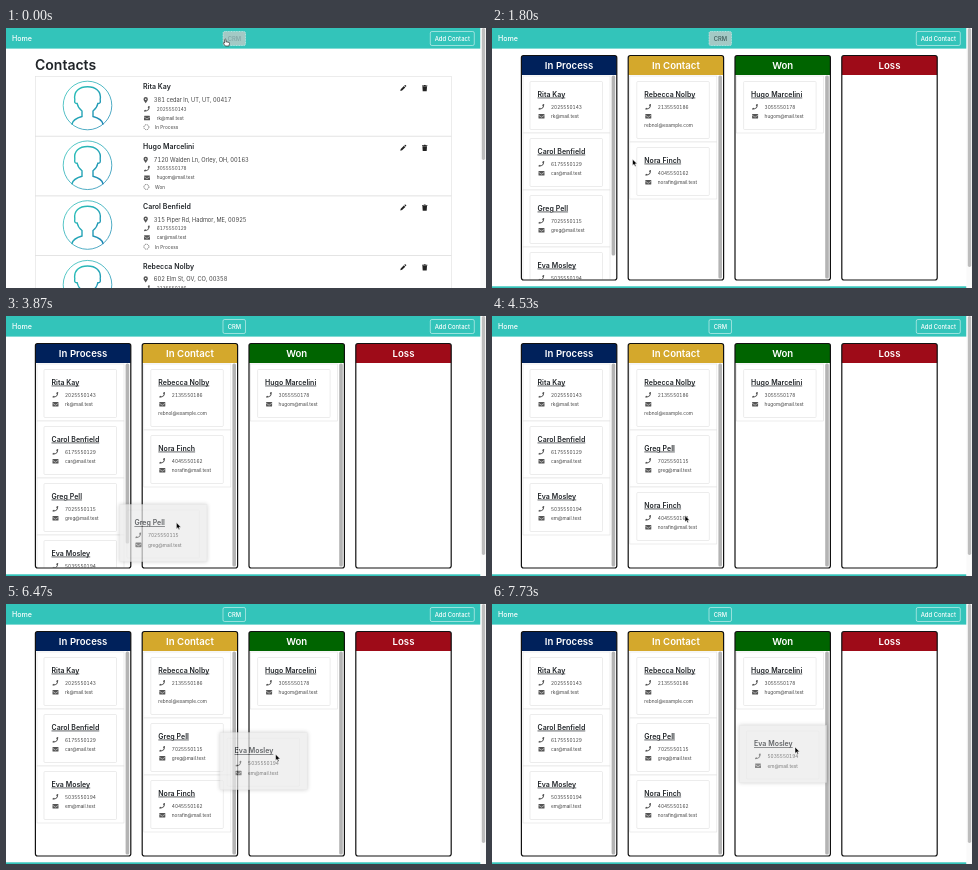
Write an HTML page that moves like this. It is 480 px wide and 260 px high and loops after 8 s.

```html
<!DOCTYPE html>
<html lang="en">
<head>
<meta charset="utf-8">
<title>Contact board</title>
<style>
html, body { margin: 0; width: 480px; height: 260px; overflow: hidden; background: #fff; }
svg { display: block; }
text { font-family: Inter, Roboto, sans-serif; font-variant-numeric: tabular-nums; fill: #444; }
.name { font-weight: 600; fill: #212529; }
.link { text-decoration: underline; }
.line { fill: none; stroke: #e0e0e0; stroke-width: .6; }
.nav { fill: #fff; font-weight: 500; }
.title { fill: #fff; font-weight: 600; }
.btn { fill: none; stroke: #fff; stroke-width: .5; }
#ghost { opacity: .7; filter: drop-shadow(0 .5px 2px #0004); }
</style>
</head>
<body>
<svg id="stage" width="480" height="260" viewBox="0 0 480 260">
  <defs>
    <linearGradient id="tint" x1="0" y1="0" x2="1" y2="1">
      <stop offset="0" stop-color="#2cc4b8"/><stop offset="1" stop-color="#1f86b4"/>
    </linearGradient>
    <path id="phone" fill="#555" d="M5.8.3L4.5 0L3.7 1.5L4.5 2.4Q3.7 3.8 2.4 4.5L1.5 3.7L0 4.5L.3 5.8Q5.6 5.6 5.8.3Z"/>
    <g id="mail"><rect width="6" height="4.6" rx=".6" fill="#555"/><path d="M0 1.2L3 3.2L6 1.2" fill="none" stroke="#fff" stroke-width=".5"/></g>
    <path id="pin" fill="#555" fill-rule="evenodd" d="M2.2 6.2C1.4 4.8 0 3.7 0 2.2A2.2 2.2 0 0 1 4.4 2.2C4.4 3.7 3 4.8 2.2 6.2ZM2.2 1.4A.8.8 0 1 0 2.2 3A.8.8 0 1 0 2.2 1.4Z"/>
    <circle id="spin" r="2.5" fill="none" stroke="#555" stroke-width=".8" stroke-dasharray="1.2 .76"/>
    <path id="pencil" fill="#222" d="M0 6L.4 4.2L3.6 1L5 2.4L1.8 5.6ZM4 .6L4.6 0Q5 -.2 5.4.2L5.8.6Q6.2 1 5.8 1.4L5.4 2Z"/>
    <path id="trash" fill="#222" d="M0 .5H1.6L2 0H3.4L3.8.5H5.4V1.2H0ZM.4 1.6H5L4.7 6.2H.7Z"/>
    <g id="avatar" fill="none" stroke="url(#tint)">
      <circle r="24.3" stroke-width=".8"/>
      <path stroke-width="1.4" stroke-linecap="round" d="M-15.5 18.5Q-14.5 13.5-5.5 11V5.5Q-9.5 2.5-10.3-2Q-13.5-1.5-12.7-6C-14-14.5-8-18.7 0-18.7C8-18.7 14-14.5 12.7-6Q13.5-1.5 10.3-2Q9.5 2.5 5.5 5.5V11Q14.5 13.5 15.5 18.5"/>
    </g>
  </defs>
  <g id="contacts"></g>
  <g id="before"></g>
  <g id="after"></g>
  <rect width="474.5" height="20.6" fill="#33c4ba"/>
  <text class="nav" x="6" y="13.3" font-size="7.1">Home</text>
  <rect id="crm" class="btn" x="217" y="3.5" width="22.5" height="14" rx="1.6"/>
  <text id="crmText" class="nav" x="228.3" y="12.7" font-size="5.8" text-anchor="middle">CRM</text>
  <rect class="btn" x="424.3" y="3.5" width="44" height="14" rx="1.6"/>
  <text class="nav" x="446.3" y="12.7" font-size="5.9" text-anchor="middle">Add Contact</text>
  <rect x="474.5" width="5.5" height="260" fill="#fafafa"/>
  <rect id="thumb" x="475.8" width="3.4" rx="1.7" fill="#bdbdbd"/>
  <path id="status" d="M0 255H40Q42 255 42 257V260H0Z" fill="#dee1e6"/>
  <g id="ghost"></g>
  <g id="cursor">
    <path id="arrow" d="M0 0V6.4L1.5 5.1L2.5 7.3L3.5 6.8L2.6 4.7H4.6Z" fill="#000" stroke="#fff" stroke-width=".5"/>
    <path id="hand" d="M0 .6Q.7-.4 1.3.6V2.8L4.4 3.4Q5 3.7 4.8 4.5L4.2 7H.6L-1.5 4.2Q-1.4 3.2 0 4Z" fill="#fff" stroke="#111" stroke-width=".6"/>
  </g>
</svg>
<script>
const $ = id => document.getElementById(id);
const person = (name, phone, mail, address, status) => ({ name, phone, mail, address, status });
const rita = person('Rita Kay', '2025550143', 'rk@mail.test', '381 cedar ln, UT, UT, 00417', 'In Process');
const hugo = person('Hugo Marcelini', '3055550178', 'hugom@mail.test', '7120 Walden Ln, Orley, OH, 00163', 'Won');
const carol = person('Carol Benfield', '6175550129', 'car@mail.test', '315 Piper Rd, Hadmor, ME, 00925', 'In Process');
const rebecca = person('Rebecca Nolby', '2135550186', 'rebnol@example.com', '602 Elm St, OV, CO, 00358', 'In Contact');
const nora = person('Nora Finch', '4045550162', 'norafin@mail.test');
const greg = person('Greg Pell', '7025550115', 'greg@mail.test');
const eva = person('Eva Mosley', '5035550194', 'em@mail.test');

const text = (x, y, size, s, attrs = '') => `<text x="${x}" y="${y}" font-size="${size}" ${attrs}>${s}</text>`;
const icon = (id, x, y) => `<use href="#${id}" x="${x}" y="${y}"/>`;
const wraps = p => p.mail.length > 17;
const cardHeight = p => wraps(p) ? 66 : 57;

function card(p, fill = '#fff') {
  const h = cardHeight(p);
  return `<rect class="line" width="87" height="${h}" style="fill:${fill}"/>
    <rect class="line" x="7" y="5.5" width="72.5" height="${h - 9}" rx="1"/>` +
    text(14.5, 20.6, 7, p.name, 'class="name link"') +
    icon('phone', 15.5, 28) + text(28, 32.8, 4.75, p.phone) +
    icon('mail', 15.5, 38) + (wraps(p) ? text(14.5, 51.2, 4.75, p.mail) : text(28, 42, 4.75, p.mail));
}

function column(i, title, color, people) {
  const x = 29.4 + i * 106.8;
  let y = 1, cards = '';
  for (const p of people) {
    cards += `<g transform="translate(1.6 ${y})">${card(p)}</g>`;
    y += cardHeight(p);
  }
  const bar = people.length ? `<rect x="90.2" y=".5" width="3.6" height="${y > 204 ? 180 : 203}" rx="1.5" fill="#b4b4b4"/>` : '';
  return `<path d="M${x} 47V29.5Q${x} 27.5 ${x + 2} 27.5H${x + 93.4}Q${x + 95.4} 27.5 ${x + 95.4} 29.5V47Z" fill="${color}"/>
    <svg x="${x}" y="47" width="95" height="204.5">${cards}${bar}</svg>
    <rect x="${x}" y="27.5" width="95.4" height="224.5" rx="2.2" fill="none" stroke="#111" stroke-width="1.2"/>` +
    text(x + 47.7, 41.2, 9.6, title, 'class="title" text-anchor="middle"');
}

const board = (process, contact) =>
  column(0, 'In Process', '#00215b', process) +
  column(1, 'In Contact', '#d4a82c', contact) +
  column(2, 'Won', '#006400', [hugo]) +
  column(3, 'Loss', '#9e0b18', []) +
  '<rect y="258.3" width="474.5" height="2" fill="#33c4ba"/>';

const row = (p, i) => `<g transform="translate(0 ${i * 59.75})">
  <rect class="line" x="29.3" y="48.4" width="416" height="59.75"/>
  <use href="#avatar" x="81.5" y="77.5"/>` +
  text(137, 61.3, 7, p.name, 'class="name"') +
  icon('pin', 137.5, 69) + text(147.8, 74, 5.7, p.address) +
  icon('phone', 138, 78) + text(150.8, 82.7, 4.6, p.phone) +
  icon('mail', 138, 87.7) + text(150.8, 91.7, 4.6, p.mail) +
  icon('spin', 140.4, 99.2) + text(149, 101, 4.7, p.status) +
  icon('pencil', 394.3, 57) + icon('trash', 416, 57) + '</g>';

$('contacts').innerHTML = text(29, 41.8, 14, 'Contacts', 'class="name"') +
  [rita, hugo, carol, rebecca].map(row).join('');
$('before').innerHTML = board([rita, carol, greg, eva], [rebecca, nora]);
$('after').innerHTML = board([rita, carol, eva], [rebecca, greg, nora]);

// Pointer path: time, x, y
const path = [
  [0, 218.7, 11], [70, 218.7, 11], [330, 224, 11], [1270, 224, 11], [1530, 49, 194.5],
  [1670, 49, 194.5], [1800, 140.5, 131], [1930, 145, 153], [2270, 145, 153], [2670, 87.5, 180],
  [3130, 87.5, 180], [3330, 106, 188.7], [3600, 140, 200], [3930, 177, 208], [4000, 179, 207],
  [4330, 193, 199.5], [4870, 193, 199.5], [5330, 86.5, 183.5], [5600, 86.5, 183.5], [5780, 108, 195],
  [5930, 140, 191], [6400, 259, 153], [6470, 269.5, 150.2], [6870, 309, 142], [7070, 309, 142],
  [7330, 305, 142], [7670, 305, 142], [7730, 303, 143], [8000, 303, 143]
];
const drags = [
  { who: greg, from: 3130, to: 4330, x: 87.5, y: 180 },
  { who: eva, from: 5600, to: 8000, x: 86.5, y: 183.5 }
];

function pointer(t) {
  const i = path.findIndex(p => p[0] > t);
  const [t0, x0, y0] = path[i - 1], [t1, x1, y1] = path[i];
  const k = (t - t0) / (t1 - t0);
  return [x0 + (x1 - x0) * k, y0 + (y1 - y0) * k];
}

const show = (id, on) => $(id).style.display = on ? '' : 'none';
let held;

function draw(now) {
  const t = now % 8000, [x, y] = pointer(t);
  const onBoard = t >= 870, dropped = t >= 4330, lit = t < 1870;
  show('contacts', !onBoard);
  show('before', onBoard && !dropped);
  show('after', dropped);
  $('thumb').setAttribute('height', onBoard ? 239 : 132);
  show('status', t >= 200 && t < 730);

  const fade = Math.min(1, t / 230);
  $('crm').style.fill = lit ? '#a3c9c5' : 'none';
  $('crm').style.strokeDasharray = lit ? '1 .6' : 'none';
  $('crmText').style.fill = lit ? `rgb(${130 - 70 * fade},${165 - 75 * fade},${165 - 77 * fade})` : '#fff';

  const drag = drags.find(d => t > d.from && t < d.to);
  show('ghost', drag);
  if (drag) {
    if (held !== drag) $('ghost').innerHTML = card(drag.who, '#ebebeb');
    $('ghost').setAttribute('transform', `translate(${31 + x - drag.x} ${162 + y - drag.y})`);
  }
  held = drag;

  show('hand', t < 1300);
  show('arrow', t >= 1300);
  $('cursor').setAttribute('transform', `translate(${x} ${y})`);
}

const start = performance.now();
function tick() {
  draw(performance.now() - start);
  requestAnimationFrame(tick);
}
tick();
</script>
</body>
</html>
```
